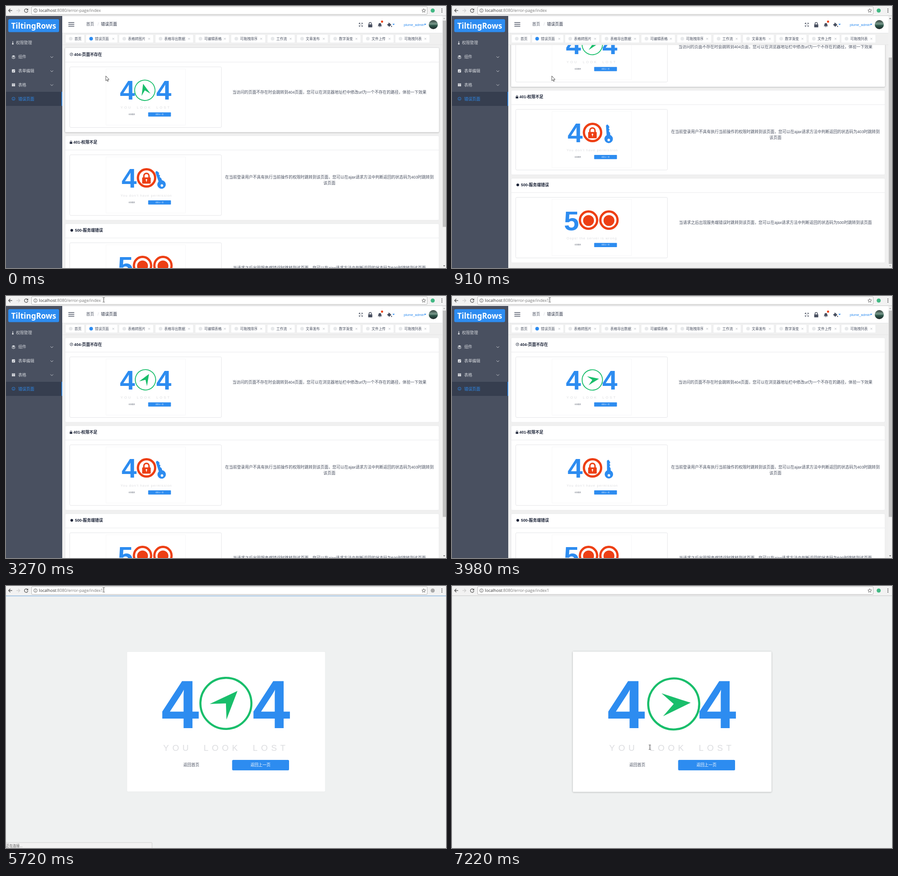
These frames come from a looping animation (970 px wide and 577 px high, 7.27 s). An HTML page:

```html
<!DOCTYPE html>
<html lang="zh-CN">
<head>
<meta charset="utf-8">
<title>Error pages</title>
<style>
html, body { margin: 0; width: 100%; height: 100%; overflow: hidden; background: #f0f0f0; }
svg { display: block; width: 100%; height: 100%; }
text { font-family: 'Liberation Sans', 'Noto Sans CJK SC', 'Noto Sans CJK JP', 'Noto Sans CJK', sans-serif; white-space: pre; }
.url { font-family: 'Open Sans', 'Noto Sans', sans-serif; }
.brand { font-family: 'Noto Sans', 'Open Sans', sans-serif; }
</style>
</head>
<body>
<svg id="stage" viewBox="0 0 970 577"></svg>
<script>
const LOOP = 7270, OPEN = 5610, DIAL_START = 5690, FREEZE = 4670;
const BLUE = '#2d8cf0', RED = '#ed3f14', GREEN = '#19be6b', INK = '#495060', DARK = '#1c2438';
const CARD_STEP = 193.7;

// ---- drawing helpers ----
const rect = (x, y, w, h, fill, extra = '') =>
  `<rect x="${x}" y="${y}" width="${w}" height="${h}" fill="${fill}" ${extra}/>`;
const dot = (x, y, r, fill, extra = '') => `<circle cx="${x}" cy="${y}" r="${r}" fill="${fill}" ${extra}/>`;
const text = (x, y, size, fill, str, extra = '') =>
  `<text x="${x}" y="${y}" font-size="${size}" fill="${fill}" ${extra}>${str}</text>`;
const line = (d, stroke, width = 1, extra = '') =>
  `<path d="${d}" fill="none" stroke="${stroke}" stroke-width="${width}" ${extra}/>`;
const shape = (d, fill, extra = '') => `<path d="${d}" fill="${fill}" ${extra}/>`;
const group = (attrs, ...parts) => `<g ${attrs}>${parts.join('')}</g>`;
const at = (x, y, ...parts) => group(`transform="translate(${x} ${y})"`, ...parts);
const MID = 'text-anchor="middle"', BOLD = 'font-weight="700"';

const padlock = (x, y, k, fill) => group(`transform="translate(${x} ${y}) scale(${k})"`,
  rect(-4.5, -1, 9, 6.5, fill, 'rx=".7"'), line('M-2.7 -.5V-2.6a2.7 2.7 0 0 1 5.4 0V-.5', fill, 1.5));

// ---- error faces, drawn at full page size ----
const digit = (x, ch) => text(x, 313, 150, BLUE, ch, `${MID} ${BOLD}`);
const faceBase = (msg, size, gap) =>
  text(346.5, 363, size, '#dcdde0', msg, `letter-spacing="${gap}"`) +
  text(408.5, 397.3, 8.8, INK, '返回首页', MID) +
  rect(498.5, 383, 125.5, 23, BLUE, 'rx="2.5"') +
  text(561, 397.3, 8.8, '#fff', '返回上一页', MID);
const face404 = () => digit(384, '4') + digit(585, '4') +
  group('class="dial"',
    dot(485, 258.5, 56.2, 'none', `stroke="${GREEN}" stroke-width="4.6"`),
    at(485, 258.5, shape('M26.5 -26.5L-35.7 0H0V35.7Z', GREEN))) +
  faceBase('YOU\u00a0\u00a0LOOK\u00a0\u00a0LOST', 19, 7.5);
const ring = (x, y) => dot(x, y, 19, '#fff', `stroke="${RED}" stroke-width="5"`);
const small = body => group('transform="translate(114 81.1) scale(.4)"', body);

const key = at(346, 208.3, group('id="key"',
  shape('M-4 -16V-39L-1 -41.5 1.5 -39 3.5 -35 1.5 -32.5 3.5 -29.5 1.5 -26.5 4 -22.5V-16Z', BLUE),
  dot(0, -9.4, 9.3, BLUE), dot(0, -7, 2.8, '#fff')));

const faces = [
  small(face404()),
  small(digit(393.5, '4') + faceBase("You don't have permission", 18.75, 2.6)) +
    ring(309.8, 184.8) + padlock(309.6, 186, 2.1, RED) + dot(309.6, 189.2, 1.8, '#fff') +
    rect(309, 189.5, 1.2, 4, '#fff') + key,
  small(digit(373.5, '5') + faceBase('Oops! the server is wrong', 18.75, 2.6)) +
    [301, 346].map(x => ring(x, 184.2) + dot(x, 185.2, 12, RED)).join('')
];

// ---- dashboard ----
const titles = [
  [150, '404-页面不存在', dot(144.3, 106.5, 3.2, 'none', `stroke="${DARK}" stroke-width=".8"`) +
    shape('M146 104.8L142.2 106.5H144.3V108.6Z', DARK)],
  [148.5, '401-权限不足', padlock(143.3, 106.5, .62, DARK)],
  [152, '500-服务端错误', dot(145, 106.6, 3, DARK)]
];
const notes = [
  ['当访问的页面不存在时会跳转到404页面，您可以在浏览器地址栏中修改url为一个不存在的路径，体验一下效果'],
  ['在当前登录用户不具有执行当前操作的权限时跳转到该页面，您可以在ajax请求方法中判断返回的状态码为403时跳转到', '该页面'],
  ['当请求之后出现服务端错误时跳转到该页面，您可以在ajax请求方法中判断返回的状态码为500时跳转到该页面']
];
const card = i => {
  const [x, title, icon] = titles[i];
  const top = i === 1 ? 186.5 : 193;
  return at(0, i * CARD_STEP,
    i ? '' : rect(130, 92, 824.5, 186, '#fff', 'id="glow" rx="2.5" filter="url(#soft)"'),
    rect(130.5, 92, 824, 186, '#fff', 'rx="2.5" stroke="#e6e7e9" stroke-width=".7"'),
    line('M130.5 123.5H954.5', '#e9eaec'), icon,
    text(x, 109.8, 8.8, DARK, title, BOLD),
    rect(140.5, 134, 334.5, 133.5, '#fff', 'rx="2.5" stroke="#e4e5e8"'),
    rect(220.5, 138.5, 175, 123.8, 'none', 'stroke="#f7f7f8"'),
    faces[i],
    notes[i].map((s, n) => text(713, top + n * 13.2, 8.77, INK, s, MID)).join(''));
};

const tabs = [[131, 42, '首页'], [176, 70, '错误页面'], [249, 76, '表格转图片'], [329, 84, '表格导出数据'],
  [417, 75, '可编辑表格'], [496, 76, '可拖拽排序'], [576, 61, '工作流'], [641, 69, '文章发布'],
  [714, 68, '数字渐变'], [786, 69, '文件上传'], [858, 76, '可拖拽列表']];
const tab = ([x, w, label], i) => rect(x, 63, w, 18, '#fff', 'rx="1.5" stroke="#e9eaec" stroke-width=".7"') +
  dot(x + 11.7, 72, 4, i === 1 ? BLUE : '#e6e8ea') + text(x + 20, 75, 7.7, INK, label) +
  (i ? line(`M${x + w - 11.5} 70.2l4 4m0 -4l-4 4`, '#a0a5ae', .7) : '');

const menu = [[22, 81, '权限管理'], [27, 112, '组件'], [27, 143, '表单编辑'], [27, 173.5, '表格'], [27, 204.3, '错误页面']];
const menuItem = ([x, y, label], i) => text(x, y + 3.3, 8.8, i === 4 ? BLUE : '#d5d8dd', label) +
  (i > 0 && i < 4 ? line(`M98 ${y - 1}l3 3 3 -3`, '#c5c8ce') : '');
const LIGHT = '#e3e5e9';
const sidebar = rect(0, 22, 124, 555, INK) +
  rect(5, 29, 112, 28.5, BLUE, 'rx="3"') +
  text(61, 49.5, 17, '#fff', 'TiltingRows', `class="brand" ${MID} ${BOLD}`) +
  rect(0, 189, 124, 31, '#363e4f') + rect(122.4, 189, 1.6, 31, BLUE) +
  menu.map(menuItem).join('') +
  line('M15 77.5V82', LIGHT, 1.2) + dot(15, 83.3, 1.7, LIGHT) +
  shape('M12.5 110.5L16.5 108.5 20.5 110.5 16.5 112.5Z', LIGHT) +
  line('M12.5 112.5L16.5 114.4 20.5 112.5M12.5 114.4L16.5 116.3 20.5 114.4', LIGHT, .9) +
  rect(13, 139.5, 7, 7, LIGHT, 'rx="1"') + line('M14.5 143l1.6 1.6 2.6 -3.2', INK, .9) +
  rect(13, 170.5, 7, 6.4, LIGHT) + line('M13 172.8h7M15.3 170.5v6.4M17.7 170.5v6.4', INK, .35) +
  dot(16.5, 204.2, 3.4, 'none', `stroke="${BLUE}" stroke-width=".8"`) +
  line('M14.8 206.2q1.7 -1.8 3.4 0M15.2 203h.8M17.2 203h.8', BLUE, .8);

const header = rect(124, 22, 838, 38, '#fff') + rect(124, 60, 838, 25.5, '#f0f0f0') +
  line('M124 59.8H962', '#dedfe1', .9) + line('M124 85.3H962', '#e2e2e2', .7) +
  line('M137.5 36.5h13M137.5 40.5h13M137.5 44.5h13', INK, 1.3) +
  text(176.8, 42.9, 8.8, INK, '首页') + text(202, 42.9, 8.8, '#d0d3d8', '/') +
  text(209.5, 42.9, 8.8, DARK, '错误页面', 'font-weight="500"') +
  line('M778.5 40v-2.5h2.5M783.5 37.5h2.5v2.5M786 42.5v2.5h-2.5M781 45h-2.5v-2.5M779 38l2.4 2.4M785.5 38l-2.4 2.4M785.5 44.5l-2.4 -2.4M779 44.5l2.4 -2.4', INK, 1) +
  padlock(803, 41.5, 1, INK) +
  shape('M819.5 44.5q1.6 -1.3 1.6 -4.2a3.2 3.8 0 0 1 6.2 0q0 2.9 1.6 4.2ZM822.8 45.2h2.8a1.4 1.4 0 0 1 -2.8 0Z', INK) +
  dot(829, 34.5, 2.4, RED) +
  shape('M840 41.2L845 37l4.6 4.6 -4.8 4.2Z', INK) + line('M843 36.2l3 3', INK, 1) + dot(850, 45, 1.2, INK) +
  shape('M852 39.3h5l-2.5 3Z', BLUE) +
  text(877, 43.8, 7.5, BLUE, 'plume_admin') + shape('M921.5 39.3h5l-2.5 3Z', BLUE) +
  dot(942, 41, 10, 'url(#photo)') +
  tabs.map(tab).join('');

const scrollbar = rect(962, 22, 8, 555, '#f1f1f1') +
  shape('M963.8 28.6h4.4l-2.2 -2.6Z', '#505050', 'id="up"') +
  shape('M963.8 571.2h4.4l-2.2 2.6Z', '#505050', 'id="down"') +
  rect(962.8, 32, 7.2, 454.5, '#c1c1c1', 'id="thumb"');

const dashboard = group('id="dash"', rect(0, 22, 970, 555, '#f0f0f0'),
  group('clip-path="url(#view)"', group('id="cards"', card(0), card(1), card(2))),
  header, sidebar, scrollbar);

const lost = group('id="lost"', rect(0, 22, 970, 555, '#eff1f1'),
  rect(266, 144, 438.5, 309.5, '#fff', 'id="lostGlow" rx="2" filter="url(#soft)"'),
  rect(266.5, 144.5, 437.5, 308.5, '#fff', 'rx="2" stroke="#e6e8e9" stroke-width=".7"'),
  face404());

// ---- browser chrome ----
const GREY = '#555';
const toolbar = rect(0, 0, 970, 22, '#f2f2f2') + line('M0 21.4H970', '#c3c5c6', .9) +
  rect(0, 21, 970, 1.7, BLUE, 'id="progress"') +
  rect(56.5, 1.5, 872, 17, '#fff', 'rx="1.5" stroke="#b9b9b9"') +
  line('M13.5 10H6M9.5 6.2L5.7 10l3.8 3.8', GREY, 1.3) +
  line('M23 10h7.5M27 6.2l3.8 3.8 -3.8 3.8', '#cfcfcf', 1.3) +
  group('id="reload"', line('M47.4 7.6a3.9 3.9 0 1 0 .9 3.3', GREY, 1.3), shape('M48.8 5.4v4h-4Z', GREY)) +
  line('M41 6.5l7 7m0 -7l-7 7', GREY, 1.3, 'id="stop"') +
  dot(65, 10, 3.8, 'none', `stroke="${GREY}" stroke-width=".9"`) + line('M65 9.4v2.8M65 7.6v1', GREY, .9) +
  text(72.6, 13.2, 9.1, '#333', 'localhost<tspan fill="#777">:8080/error-page/index<tspan id="typed"></tspan></tspan>', 'class="url"') +
  line('M921 5.8l1.2 2.8 3 .3 -2.3 2 .7 3 -2.6 -1.6 -2.6 1.6 .7 -3 -2.3 -2 3 -.3Z', GREY, .9) +
  dot(940.7, 10, 4.5, '#41b883', 'id="ext"') +
  [6.6, 10, 13.4].map(y => dot(961, y, 1.1, GREY)).join('');

const status = group('id="status"', rect(-1, 565, 323, 13, '#f2f2f2', 'stroke="#cfcfcf" rx="1"'),
  text(0, 574.6, 7.5, '#555', '正在连接...'));

const pointer = group('id="pointer"',
  shape('M0 0V10.6L2.4 8.4 4 12 5.6 11.3 4.1 7.8H7.3Z', '#fff', 'id="arrow" stroke="#222" stroke-width=".8"') +
  line('M-2.2 -5h1.5l.7 .6 .7 -.6h1.5M0 -4.4v8.8M-2.2 5h1.5l.7 -.6 .7 .6h1.5', '#333', .9, 'id="beam"'));

const defs = `<defs>
<clipPath id="view">${rect(124, 85.5, 838, 492, '#000')}</clipPath>
<filter id="soft" x="-5%" y="-10%" width="110%" height="120%"><feDropShadow dx="0" dy=".7" stdDeviation="1.8" flood-color="#000" flood-opacity=".32"/></filter>
<linearGradient id="photo" x1="0" y1="0" x2="0" y2="1"><stop offset="0" stop-color="#33413d"/><stop offset=".42" stop-color="#78998c"/><stop offset=".6" stop-color="#2c5548"/><stop offset="1" stop-color="#20282a"/></linearGradient>
</defs>`;

const stage = document.getElementById('stage');
stage.innerHTML = defs + dashboard + lost + toolbar + status + pointer;
const $ = id => document.getElementById(id);
const [smallDial, bigDial] = stage.querySelectorAll('.dial');

// ---- motion ----
const clamp = v => Math.min(1, Math.max(0, v));
const mix = (a, b, p) => a + (b - a) * p;
// cubic-bezier(.25, .1, .25, 1)
function ease(x) {
  let lo = 0, hi = 1, u = .5;
  const curve = (a, b) => 3 * a * u * (1 - u) ** 2 + 3 * b * u * u * (1 - u) + u ** 3;
  for (let i = 0; i < 18; i++) {
    u = (lo + hi) / 2;
    if (curve(.25, .25) < x) lo = u; else hi = u;
  }
  return curve(.1, 1);
}
const span = (t, from, to) => ease(clamp((t - from) / (to - from)));
function keyframes(stops, p) {
  let i = 1;
  while (i < stops.length - 1 && p > stops[i][0]) i++;
  const [p0, a] = stops[i - 1], [p1, b] = stops[i];
  return mix(a, b, ease(clamp((p - p0) / (p1 - p0))));
}
const SWING = [[0, 0], [.2, -60], [.4, -10], [.6, 50], [.8, -20], [1, 0]];
const JIGGLE = [[0, 0], [.4, -20], [.45, -15], [.5, -20], [.55, -15], [.6, -20], [1, 0]];
function dialAngle(ms) {
  const p = Math.max(0, ms) / 3000 % 2;
  return keyframes(SWING, p > 1 ? 2 - p : p);
}
const spin = (el, a) => el.setAttribute('transform', `rotate(${a.toFixed(2)} 485.2 264.2)`);
const show = (id, on) => $(id).setAttribute('display', on ? 'inline' : 'none');

function pointerAt(t) {
  const up = span(t, 1590, 1780), down = span(t, 6390, 7110);
  return [mix(mix(220, 215.5, up), 436, down), mix(mix(154, 8.5, up), 355, down)];
}

function draw(t) {
  const onLost = t >= OPEN;
  show('dash', !onLost);
  show('lost', onLost);

  const live = Math.min(t, FREEZE);
  spin(smallDial, dialAngle(live + 548));
  spin(bigDial, dialAngle(t - DIAL_START));
  $('key').setAttribute('transform', `rotate(${keyframes(JIGGLE, (live + 1340) / 2800 % 1).toFixed(2)})`);

  const scroll = 100 * (span(t, 200, 860) - span(t, 1440, 1640));
  $('cards').setAttribute('transform', `translate(0 ${-scroll.toFixed(2)})`);
  $('thumb').setAttribute('y', 32 + scroll * .815);
  $('up').setAttribute('fill', scroll > .5 ? '#505050' : '#a3a3a3');
  $('down').setAttribute('fill', scroll < 99.5 ? '#505050' : '#a3a3a3');

  const [x, y] = pointerAt(t);
  $('pointer').setAttribute('transform', `translate(${x.toFixed(2)} ${y.toFixed(2)})`);
  const beam = y < 19 || t >= 7110;
  show('beam', beam);
  show('arrow', !beam);
  show('glow', y > 92 - scroll && y < 278 - scroll && y > 85);
  show('lostGlow', x > 266 && y > 144);

  const loading = t >= 4400 && t < OPEN;
  show('stop', loading);
  show('reload', !loading);
  $('typed').textContent = t >= 3700 ? '1' : '';
  $('ext').setAttribute('fill', t >= 4400 && t < 6400 ? '#a9a9a9' : '#41b883');
  show('status', t >= 4820 && t < 6250);
  $('progress').setAttribute('opacity', onLost ? .35 * (1 - clamp((t - 5800) / 650)) : 0);
}

const begin = performance.now();
function tick() {
  draw((performance.now() - begin) % LOOP);
  requestAnimationFrame(tick);
}
tick();
</script>
</body>
</html>
```
